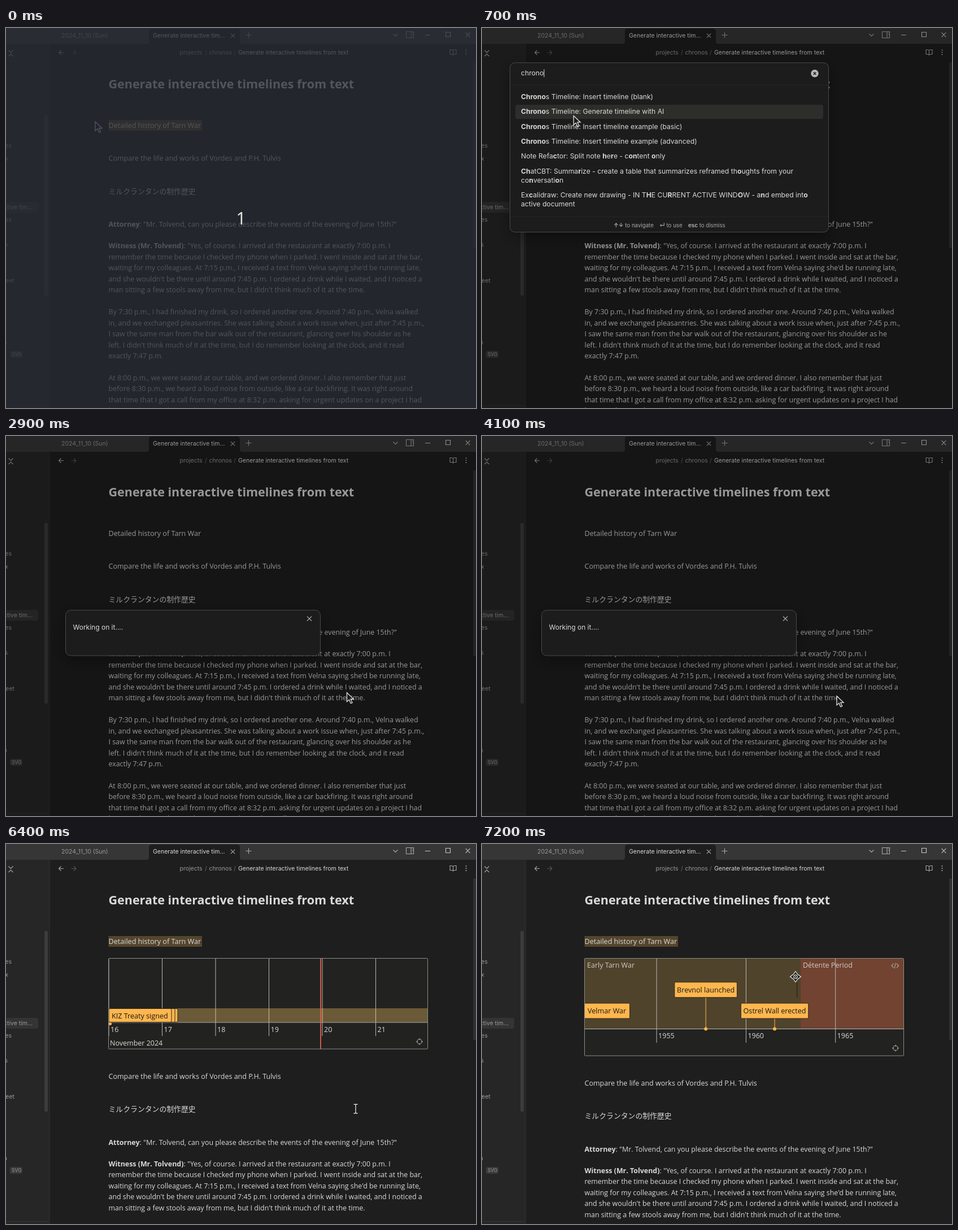
Recreate the animation shown at these times as an HTML page. Size 832 by 673 pixels, loop 8 s.

```html
<!DOCTYPE html>
<html lang="en">
<head>
<meta charset="utf-8">
<title>Timeline from text</title>
<style>
  html, body { margin: 0; width: 100%; height: 100%; overflow: hidden; background: #1e1e1e; }
  svg { display: block; }
  text { white-space: pre; fill: #dadada; font: 12.5px "Open Sans", "Noto Sans", sans-serif; }
  text.para { font-size: 12.42px; }
  text.title { font-size: 21.5px; font-weight: 700; }
  text.jp { font: 12.85px "Noto Sans CJK JP", "Noto Sans CJK", sans-serif; }
  text.ui { font: 10.5px Inter, sans-serif; }
  text.cmd { font: 12.2px Inter, sans-serif; }
  text.hint { font: 9.7px Inter, sans-serif; fill: #aaa; }
  text.tag { font: 8.5px Inter, sans-serif; }
  text.mark { font-size: 9.1px; fill: #222; }
  text.item { font-size: 12.6px; fill: #1a1a1a; }
  text.count { font: 30px "Noto Sans", sans-serif; fill: #e2e3e0; }
  .dim { fill: #999; }
  .b { font-weight: 700; }
  .icon { fill: none; stroke: #a8a8a8; stroke-width: 1.1; }
</style>
</head>
<body>
<svg id="stage" width="832" height="673" viewBox="0 0 832 673">
  <defs>
    <clipPath id="frame"><rect x="182" y="203" width="564.5" height="470"/></clipPath>
    <filter id="shadow" x="-20%" y="-40%" width="140%" height="200%">
      <feDropShadow dx="0" dy="8" stdDeviation="14" flood-color="#000" flood-opacity=".35"/>
    </filter>
  </defs>
  <g id="chrome"></g>
  <g id="head"></g>
  <g id="timeline"></g>
  <g id="body"></g>
  <rect id="dim" width="832" height="673" fill="#000" opacity=".3"/>
  <g id="palette"></g>
  <g id="modal"></g>
  <g id="cursor"></g>
  <g id="countdown"></g>
</svg>
<script>
const $ = id => document.getElementById(id);
const LOOP = 8000, STEP = 100;
const AMBER = '#ffb64d', LINE = '#b8b8b6';

// Markup helpers; text y is the middle of the capitals
const text = (x, y, s, cls = '', extra = '') => `<text x="${x}" y="${y}" class="${cls}" ${extra}>${s}</text>`;
const rect = (x, y, w, h, fill, extra = '') =>
  `<rect x="${x}" y="${y}" width="${Math.max(0, w)}" height="${h}" fill="${fill}" ${extra}/>`;
const path = (d, extra = 'class="icon"') => `<path d="${d}" ${extra}/>`;
const vline = (x, y1, y2, color, w = 1) => rect(x - w / 2, y1, w, y2 - y1, color);
const clip = (x, y, w, h, inner) => w <= 0 ? '' :
  `<svg x="${x}" y="${y}" width="${w}" height="${h}" viewBox="${x} ${y} ${w} ${h}">${inner}</svg>`;
const bold = s => `<tspan class="b">${s}</tspan>`;
const cross = (x, y, r) => `M${x - r} ${y - r}l${2 * r} ${2 * r}m0 ${-2 * r}l${-2 * r} ${2 * r}`;
const show = (id, on) => $(id).setAttribute('display', on ? 'inline' : 'none');

const pen = document.createElement('canvas').getContext('2d');
pen.font = '12.6px "Open Sans", "Noto Sans", sans-serif';
const widthOf = s => pen.measureText(s).width;

function drawChrome() {
  const side = [[10, 208, 'es'], [4, 231, 'x'], [47, 317, 'Generate interactive tim...'], [10, 339, 'es'],
    [3, 383, 's'], [15, 447, 'eet'], [2, 556, 'n']];
  $('chrome').innerHTML =
    rect(0, 0, 832, 673, '#1e1e1e') + rect(0, 0, 832, 28, '#363636') + rect(0, 28, 77, 645, '#262626') +
    vline(77, 28, 673, '#303030') + rect(0, 668, 77, 1, '#363636') +
    path('M249 28q4 0 4-4V6q0-5 5-5h151q5 0 5 5v18q0 4 4 4z', 'fill="#1e1e1e"') +
    text(98, 16.8, '2024_11_10 (Sun)', 'ui dim') + text(260, 16.8, 'Generate interactive tim...', 'ui') +
    path(cross(401.5, 13.5, 3.7) + 'M424.5 12.5h10m-5-5v10M685.5 10.5l4 4 4-4') +
    path('M708.5 6.5h13v11h-13zm8.500 0v11m2-8.500h1.500m-1.500 3h1.500') +
    path('M742 12.500h9M778.500 7.500h8v8h-8z' + cross(817.5, 12, 3.8), 'class="icon" style="stroke:#c8c8c8"') +
    path('M4.500 39.500l4 4 4-4M4.500 50l4-4 4 4') +
    rect(0, 308, 57, 19, '#343434', 'rx="3"') + rect(68, 154, 6, 320, '#3c3c3c', 'rx="2"') +
    side.map(([x, y, s]) => text(x, y + 3.8, s, 'ui dim', 'text-anchor="end"')).join('') +
    rect(7, 572, 22, 12, '#3a3a3a', 'rx="3"') + text(10, 581, 'SVG', 'tag dim') +
    path('M102 43.500h-8.500m4-4l-4 4 4 4') + path('M115.500 43.500h8.500m-4-4l4 4-4 4', 'class="icon" opacity=".4"') +
    text(307.5, 46.5, 'projects', 'ui dim') + text(352, 46.5, '/', 'ui dim', 'opacity=".6"') +
    text(359.5, 46.5, 'chronos', 'ui dim') + text(403, 46.5, '/', 'ui dim', 'opacity=".6"') +
    text(411, 46.5, 'Generate interactive timelines from text', 'ui') +
    path('M791.500 40v8m0-8q-1-1.500-2.500-1.500h-3v8h3q1.500 0 2.500 1.500q1-1.500 2.500-1.500h3v-8h-3q-1.500 0-2.500 1.500') +
    [39, 43, 47].map(y => `<circle cx="814.5" cy="${y}" r="1.1" fill="#a8a8a8"/>`).join('') +
    '<rect id="scroll" x="827" y="61" width="5" fill="#303030"/>';

  $('head').innerHTML = text(181.5, 106.5, 'Generate interactive timelines from text', 'title') +
    rect(181.5, 163, 165.5, 19, '#54452c', 'id="selection"') +
    text(181.5, 177, 'Detailed history of Tarn War', '', 'style="font-size:12.6px"');
}

function drawBody() {
  const paras = [
    [347.5, bold('Attorney') + ': "Mr. Tolvend, can you please describe the events of the evening of June 15th?"'],
    [385.7, bold('Witness (Mr. Tolvend)') + ': "Yes, of course. I arrived at the restaurant at exactly 7:00 p.m. I',
      'remember the time because I checked my phone when I parked. I went inside and sat at the bar,',
      "waiting for my colleagues. At 7:15 p.m., I received a text from Velna saying she'd be running late,",
      "and she wouldn't be there until around 7:45 p.m. I ordered a drink while I waited, and I noticed a",
      "man sitting a few stools away from me, but I didn't think much of it at the time."],
    [502.5, 'By 7:30 p.m., I had finished my drink, so I ordered another one. Around 7:40 p.m., Velna walked',
      'in, and we exchanged pleasantries. She was talking about a work issue when, just after 7:45 p.m.,',
      'I saw the same man from the bar walk out of the restaurant, glancing over his shoulder as he',
      "left. I didn't think much of it at the time, but I do remember looking at the clock, and it read",
      'exactly 7:47 p.m.'],
    [619, 'At 8:00 p.m., we were seated at our table, and we ordered dinner. I also remember that just',
      'before 8:30 p.m., we heard a loud noise from outside, like a car backfiring. It was right around',
      'that time that I got a call from my office at 8:32 p.m. asking for urgent updates on a project I had',
      'been working on that week, so I stepped outside to talk.']
  ];
  $('body').innerHTML = text(181.5, 235, 'Compare the life and works of Vordes and P.H. Tulvis') +
    text(181.5, 293.7, 'ミルクランタンの制作歴史', 'jp') +
    paras.map(([y, ...rows]) => rows.map((s, i) => text(181.5, y + 4.5 + i * 19.5, s, 'para')).join('')).join('');
}

// An asterisk marks each letter hit by the query, in typing order
const commands = [
  [122, '*C*h*r*o*n*os Timeline: Insert timeline (blank)'],
  [148, '*C*h*r*o*n*os Timeline: Generate timeline with AI'],
  [175, '*C*h*r*o*n*os Timeline: Insert timeline example (basic)'],
  [201, '*C*h*r*o*n*os Timeline: Insert timeline example (advanced)'],
  [227, 'Note Refa*ctor: Split note *he*re - c*o*ntent *only'],
  [254, '*C*hatCBT: Summa*rize - create a table that summarizes reframed th*oughts from your|co*nversati*on'],
  [296, 'Ex*calidraw: Create new drawing - IN T*HE CU*RRENT ACTIVE WIND*OW - a*nd embed int*o|active document']
];

function drawPalette(typed) {
  const pick = typed < 5 ? 0 : 1;
  const list = commands.map(([y, s]) => {
    let hit = 0;
    const marked = s.replace(/\*(.)/g, (m, c) => hit++ < typed ? bold(c) : c);
    return marked.split('|').map((row, i) => text(69, y + 4.4 + i * 15.6, row, 'cmd')).join('');
  }).join('');
  pen.save();
  pen.font = '12.2px Inter, sans-serif';
  const query = 'chrono'.slice(0, typed), caret = 69.5 + widthOf(query);
  pen.restore();
  $('palette').innerHTML =
    rect(49.5, 61.5, 564, 300, '#1b1b1a', 'rx="9" stroke="#4a4a48" filter="url(#shadow)"') +
    text(69, 84.4, query, 'cmd') + vline(caret, 73, 87, '#dadada') +
    '<circle cx="589" cy="80.5" r="6.7" fill="#b8b8b6"/>' +
    path(cross(589, 80.5, 2.3), 'stroke="#1b1b1a" stroke-width="1.4"') +
    rect(50, 100, 563, 1, '#232322') + rect(59, commands[pick][0] - 12, 545, 25, '#2d2d2c', 'rx="4"') + list +
    rect(50, 334, 563, 1, '#262625') + text(233, 352.5, bold('↑↓') + ' to navigate', 'hint') +
    text(314, 352.5, bold('↵') + ' to use', 'hint') + text(365, 352.5, bold('esc') + ' to dismiss', 'hint');
}

function drawModal() {
  $('modal').innerHTML =
    rect(105.5, 308.5, 451, 80.5, '#1c1c1b', 'rx="9" stroke="#484846" filter="url(#shadow)"') +
    path(cross(537, 323.5, 4)) + text(118.5, 343.2, 'Working on it....', 'cmd', 'style="font-size:12px"');
}

const fitIcon = y => `<circle cx="732" cy="${y}" r="4.2" class="icon"/>` +
  path(`M732 ${y - 6}v3m0 6v3M726 ${y}h3m6 0h3`);
const outline = bottom => rect(181.5, 202.5, 565, bottom - 202.5, 'none', 'stroke="#8c8c8a" rx="1"');
const inFrame = s => `<g clip-path="url(#frame)">${s}</g>`;
const box = (x, y, w, h = 27) => rect(x, y, w, h, AMBER, 'rx="2" stroke="#2a2620"');

// Day view: every item is squeezed against the left edge
function drawDays() {
  const axis = 315.5, bottom = 363;
  let s = rect(182, 203, 565, 160, '#222221');
  for (let i = 0; i < 6; i++) {
    const x = 182 + i * 94.5;
    s += vline(x, 203, 340, LINE) + text(x + 3, 332.8, 16 + i);
  }
  s += rect(182, 291, 565, 24.5, '#ffcc66', 'opacity=".33"') + rect(182, axis, 565, 1, LINE) +
    [122, 117, 111].map(w => box(182, 291.5, w, 24)).join('') + rect(182, 316, 5, 5, AMBER, 'rx="2"') +
    text(187, 308.7, 'KIZ Treaty signed', 'item') + text(184, 357, 'November 2024') +
    vline(557, 203, bottom, '#e0604c', 1.8);
  $('timeline').innerHTML = inFrame(s) + fitIcon(350) + outline(bottom);
  return bottom;
}

const periods = [
  [1947.2, 1963.05, '#50432b', 'Early Tarn War'], [1963.05, 1980.05, '#714330', 'Détente Period'],
  [1980.05, 1990, '#4b5c36', 'Second Tarn War'], [1990, 1992.1, '#50432b', '']
];
// label, year, row in the wide view, row in the close view
const points = [
  ['Gormel Doctrine', 1947.2, 4, 2], ['VEKO formed', 1949.3, 3, 1], ['Brevnol launched', 1957.75, 1, 1],
  ['Ostrel Wall erected', 1961.6, 0, 0], ['VELK I Treaty', 1972.4, 2, 0], ['ZBI announced', 1983.25, 1, 1],
  ['KIZ Treaty signed', 1987.95, 3, 2]
];
// label, start, end, rows
const spans = [
  ['', 1948.7, 1949.3, 0, 0], ['Velmar War', 1950.55, 1953.5, 2, 0], ['Kasdor-Ulm War', 1980.1, 1989.1, 0, 0]
];
const markers = [[1989.95, 'Fall of the Ostrel Wall'], [1992.1, 'End of the Tarn War | Dissolution']];

function drawYears(scale, hover) {
  const close = scale > 25, axis = 216 + 37 * (close ? 3 : 5), bottom = axis + 48;
  const X = year => 419.6 + (year - 1958.49) * scale;
  const rowY = ([a, b]) => axis - 45 - 37.25 * (close ? b : a);
  const gap = scale < 13 ? 10 : 5;
  let s = rect(182, 203, 565, bottom - 203, '#222221');
  for (const [from, to, color, name] of periods) {
    const x = Math.max(182, X(from)), w = Math.min(747, X(to)) - x;
    s += rect(x, 203, w, axis - 203, color) + clip(x, 203, w, 30, text(x + 4, 218.8, name, '', 'opacity=".9"'));
  }
  for (let y = 1900; y <= 2010; y += gap) {
    s += vline(X(y), 203, axis + 25, LINE) + text(X(y) + 3, axis + 16.8, y);
  }
  s += rect(182, axis, 565, 1, LINE);
  for (const [, year, ...rows] of points) {
    s += vline(X(year), rowY(rows) + 27, axis, AMBER) + `<circle cx="${X(year)}" cy="${axis + .5}" r="3" fill="${AMBER}"/>`;
  }
  for (const [name, from, to, ...rows] of spans) {
    const x = X(from), y = rowY(rows), w = X(to) - x, left = Math.max(187, x + 4.5);
    s += box(x, y, w) + clip(x, y, w, 27, text(left, y + 18, name, 'item'));
  }
  s += vline(X(1962.85), rowY([2, 1]), rowY([2, 1]) + 27, '#2a2620', 1.3);
  for (const [name, year, ...rows] of points) {
    const w = widthOf(name) + 8.5, y = rowY(rows);
    s += box(X(year) - w / 2, y, w) + text(X(year), y + 18, name, 'item', 'text-anchor="middle"');
  }
  if (hover) s += path('M728.500 212l-3.500 3.500 3.500 3.500m5.500-7l3.500 3.500-3.500 3.500m-1.500-8.500l-2.500 10');
  for (const [year, name] of markers) {
    s += vline(X(year), 203, bottom, '#c4c4c2', 1.6) + rect(X(year), 203, 200, 19, '#b2b2af') +
      text(X(year) + 3.5, 215.3, name, 'mark');
  }
  $('timeline').innerHTML = inFrame(s) + fitIcon(bottom - 13.5) + outline(bottom);
  return bottom;
}

const pointers = {
  arrow: path('M0 0V16L4 12.500L6.800 19L9.600 17.800L6.800 11.500H12Z', 'fill="#1b1b1b" stroke="#e4e4e4" stroke-width="1.3"'),
  beam: path('M-3.500-8h2.500l1 1 1-1h2.500M-3.500 8h2.500l1-1 1 1h2.500M0-7V7', 'fill="none" stroke="#111" stroke-width="3.4"') +
    path('M-3.500-8h2.500l1 1 1-1h2.500M-3.500 8h2.500l1-1 1 1h2.500M0-7V7', 'fill="none" stroke="#e4e4e4" stroke-width="1.4"'),
  move: path('M0-9.500L3.500-4.500 9.500 0 3.500 4.500 0 9.500-3.500 4.500-9.500 0-3.500-4.500Z', 'fill="#1b1b1b" stroke="#e4e4e4" stroke-width="1.2"') +
    '<circle r="3.2" fill="none" stroke="#e4e4e4" stroke-width="1.2"/><circle r="1" fill="#e4e4e4"/>'
};
// time, x, y
const route = [
  [0, 158, 166], [600, 162, 156], [1700, 164, 150], [1900, 164, 150], [2400, 585, 450], [2600, 585, 450],
  [3300, 628, 460.5], [6300, 628, 461], [6400, 619, 469], [6500, 732, 352], [6600, 620, 330], [6700, 620, 330],
  [6800, 498, 276], [7200, 555, 235], [LOOP, 555, 235]
];

function pointerAt(t) {
  const i = Math.max(1, route.findIndex(p => p[0] >= t));
  const [t0, x0, y0] = route[i - 1], [t1, x1, y1] = route[i];
  const k = (t - t0) / (t1 - t0);
  return [x0 + (x1 - x0) * k, y0 + (y1 - y0) * k];
}

function render(t) {
  const busy = t >= 200 && t < 5200, done = t >= 5200;
  show('countdown', t < 100);
  show('dim', busy);
  show('selection', !busy);
  show('palette', busy && t < 900);
  show('modal', busy && t >= 900);
  show('timeline', done);
  if (busy && t < 900) drawPalette(Math.max(0, Math.min(6, Math.floor((t - 200) / 80))));

  let shift = 0;
  if (done) {
    const zoom = Math.max(0, Math.min(1, (t - 6800) / 400));
    shift = (t < 6600 ? drawDays() : drawYears(6.393 * (31.66 / 6.393) ** zoom, t >= 6800)) - 182.5;
  }
  $('body').setAttribute('transform', `translate(0 ${shift})`);
  $('scroll').setAttribute('height', done ? 286 : 329);

  const [x, y] = pointerAt(t);
  $('cursor').setAttribute('transform', `translate(${x} ${y})`);
  $('cursor').innerHTML = pointers[t < 5200 ? 'arrow' : t < 7200 ? 'beam' : 'move'];
}

drawChrome();
drawBody();
drawModal();
$('countdown').innerHTML = rect(0, 0, 832, 673, '#242931', 'opacity=".75"') +
  text(416, 348, '1', 'count', 'text-anchor="middle"');

const start = performance.now();
let last = -1;
function tick() {
  const t = Math.floor((performance.now() - start) % LOOP / STEP) * STEP;
  if (t !== last) render(last = t);
  requestAnimationFrame(tick);
}
tick();
</script>
</body>
</html>
```
